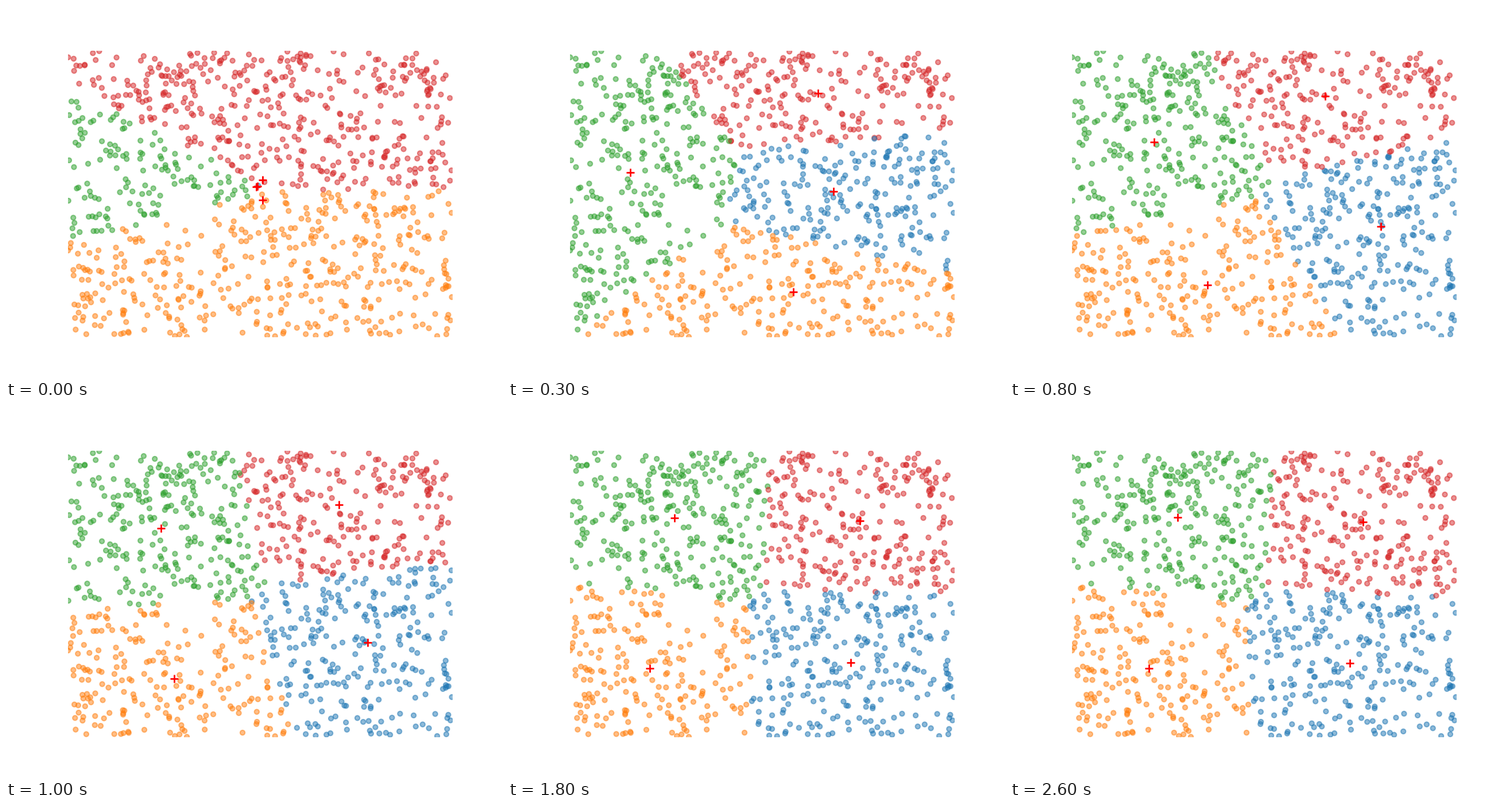
A matplotlib script for the animation above (3 s loop, 864 px wide and 648 px high).

```python
import numpy as np
import matplotlib.pyplot as plt
from matplotlib.animation import FuncAnimation
from matplotlib.colors import to_rgba_array

W, H, DPI = 864, 648, 100
COUNT = 1000
FRAMES, INTERVAL = 30, 100
COLORS = to_rgba_array(["tab:blue", "tab:orange", "tab:green", "tab:red"], 0.5)

# Axes box in pixels, and the starting centres inside it.
LEFT, RIGHT, TOP, BOTTOM = 108, 777.6, 77.76, 576.72
START = np.array([(437.6, 314), (447.4, 338.3), (436.3, 314.6), (447, 303.1)])


def to_unit(pixels):
    return (pixels - (LEFT, BOTTOM)) / (RIGHT - LEFT, TOP - BOTTOM)


def nearest(centres):
    delta = points[:, None] - centres
    return (delta**2).sum(axis=2).argmin(axis=1)


def update(centres):
    """One k-means iteration: each centre moves to the mean of its points."""
    labels = nearest(centres)
    return np.array([points[labels == k].mean(axis=0) if (labels == k).any()
                     else centre for k, centre in enumerate(centres)])


def run():
    path = [to_unit(START)]
    while len(path) < FRAMES:
        path.append(update(path[-1]))
    return path


def draw(step):
    centres = path[step]
    dots.set_color(COLORS[nearest(centres)])
    crosses.set_offsets(centres)
    return dots, crosses


np.random.seed(1)
points = np.random.rand(COUNT, 2)
path = run()

fig = plt.figure(figsize=(W / DPI, H / DPI), dpi=DPI, facecolor="white")
ax = fig.add_axes([LEFT / W, 1 - BOTTOM / H,
                   (RIGHT - LEFT) / W, (BOTTOM - TOP) / H])
ax.set_xlim(0, 1)
ax.set_ylim(0, 1)
ax.axis("off")

dots = ax.scatter(*points.T, s=36, linewidths=1.5)
crosses = ax.scatter(*path[0].T, s=100, marker="+", c="red", linewidths=2)

anim = FuncAnimation(fig, draw, frames=FRAMES, interval=INTERVAL,
                     init_func=lambda: draw(0), repeat=True, repeat_delay=0)
plt.show()
```
